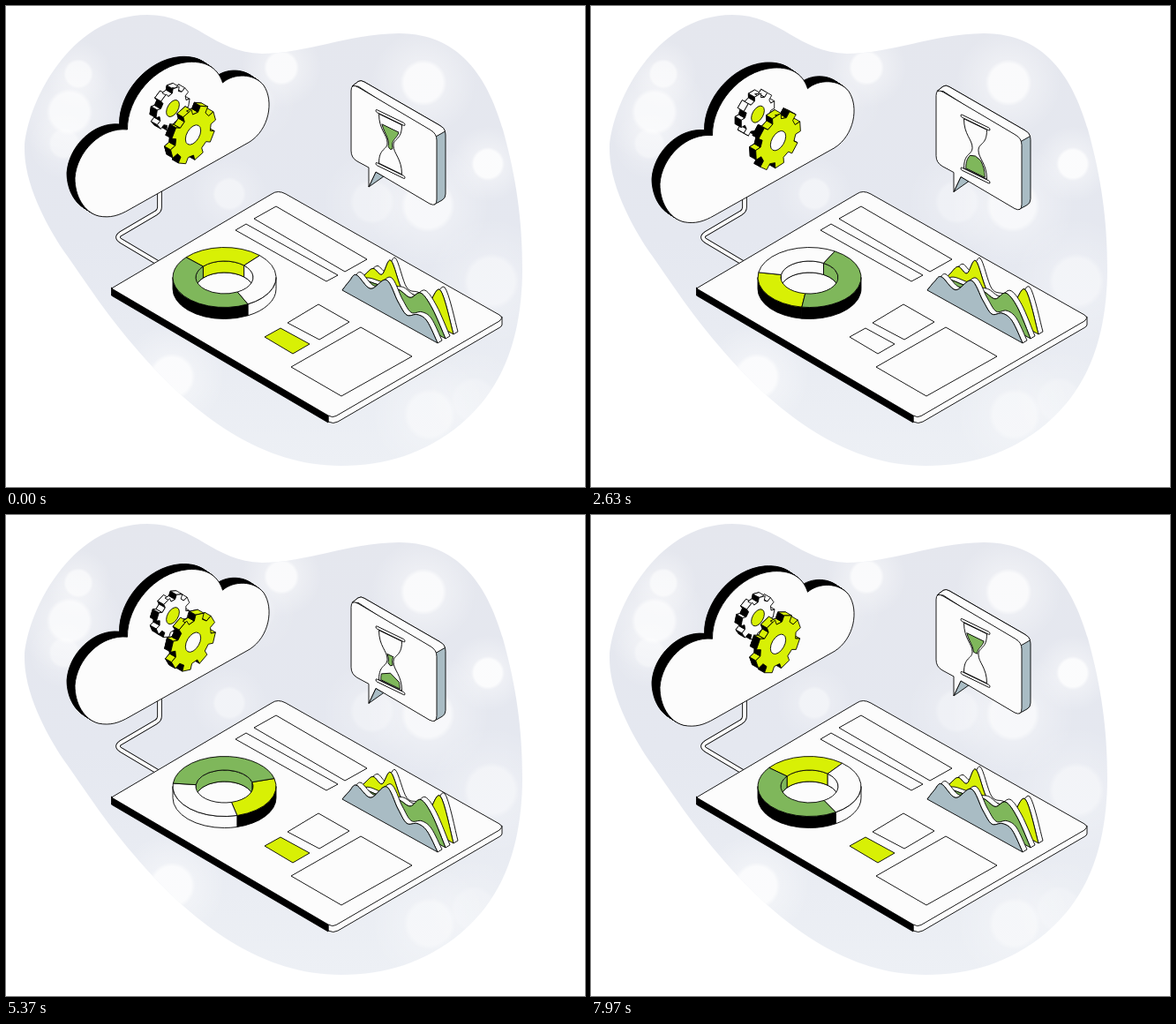
An HTML page with a canvas that plays this animation: 656x545 px, repeating every 8010 ms.

```html
<!DOCTYPE html>
<html lang="en">
<head>
<meta charset="utf-8">
<title>Cloud dashboard</title>
<style>
html, body { margin: 0; width: 100%; height: 100%; overflow: hidden; background: #fff; }
canvas { display: block; }
</style>
</head>
<body>
<canvas id="stage" width="656" height="545"></canvas>
<script>
const ctx = document.getElementById('stage').getContext('2d');
const TAU = Math.PI * 2, CYCLE = 4005, BLINK = CYCLE / 2;
const WHITE = '#fcfcfc', BLACK = '#000', LIME = '#d8f005', GREEN = '#7fb75b', STEEL = '#a9bcc4';

const clamp = v => Math.max(0, Math.min(1, v));
const wave = (t, peak) => Math.cos(TAU * (t - peak) / CYCLE);
const P = d => new Path2D(d);
const poly = pts => P('M' + pts.map(p => p.join(' ')).join('L') + 'Z');

function draw(path, fill, line = .9) {
  if (fill) { ctx.fillStyle = fill; ctx.fill(path); }
  if (line) { ctx.lineWidth = line; ctx.strokeStyle = BLACK; ctx.stroke(path); }
}
function at(x, y, fn) {
  ctx.save();
  ctx.translate(x, y);
  fn();
  ctx.restore();
}

// Backdrop
const blob = P('M21 160C23 115 70 10 160 10C215 10 235 53 290 54C340 54 385 32 445 31C520 31 548 90 563 140C578 195 585 240 585 300C584 390 555 440 515 474C475 507 430 521 380 521C290 521 220 465 170 413C120 360 97 322 65 277C45 247 20 200 21 160Z');
const lights = [
  [82, 77, 16, .7], [72, 120, 25, .75], [66, 156, 17, .5], [312, 70, 19, .8],
  [473, 87, 25, .8], [546, 179, 18, .85], [478, 226, 29, .7], [253, 213, 18, .5],
  [415, 222, 24, .4], [285, 110, 20, .2], [188, 420, 25, .8], [550, 312, 30, .5],
  [480, 463, 28, .5], [530, 447, 25, .3]
];
function backdrop() {
  const g = ctx.createLinearGradient(0, 10, 0, 521);
  g.addColorStop(0, '#e5e7ee');
  g.addColorStop(.5, '#e5e8f0');
  g.addColorStop(1, '#edf0f5');
  ctx.save();
  draw(blob, g, 0);
  ctx.clip(blob);
  for (const [x, y, r, a] of lights) {
    const size = 2.4 * r, glow = ctx.createRadialGradient(x, y, 0, x, y, size);
    for (const [stop, k] of [[0, 1], [.36, 1], [.44, .4], [1, 0]])
      glow.addColorStop(stop, `rgba(255,255,255,${a * k})`);
    ctx.fillStyle = glow;
    ctx.fillRect(x - size, y - size, 2 * size, 2 * size);
  }
  ctx.restore();
}

// Board with its cable and panels
const pipe = P('M174 200V228Q174 232 170 234.500L130 258Q124 262 130 266L172 291');
const panels = [
  'M281 241L306 227L409 287L384 301Z', 'M260 254L272 247L376 305L363 312Z',
  'M319 359L354 338L389 358L355 378Z', 'M323 409L402 364L460 397L380 442Z'
].map(P);
const tile = P('M293 375L311 365L344 383L325 394Z');
function board(t) {
  draw(pipe, null, 5.6);
  ctx.strokeStyle = WHITE;
  ctx.lineWidth = 3.8;
  ctx.stroke(pipe);
  draw(P('M365 464L562 352V361Q562 363 559 364.500L376 471Q371 474 365 471Z'), WHITE);
  draw(P('M119.500 319V328L365 472V463Z'), BLACK);
  draw(P('M119.500 320L301 213Q308 208 317 213L559 350Q564 353 559 357L374 464.500Q370 467 365 464Z'), WHITE);
  panels.forEach(p => draw(p, WHITE));
  const p = t % BLINK;
  ctx.globalAlpha = p < 500 ? clamp(1 - p / 400) : clamp((p - 640) / 360);
  draw(tile, LIME, 0);
  ctx.globalAlpha = 1;
  draw(tile);
}

// Turning ring chart
const RING = { x: 247.5, y: 307.5, rx: 58.5, ry: 34, ix: 32.5, iy: 18.5, depth: 13 };
const parts = [[0, 91, LIME, BLACK], [91, 201, WHITE, WHITE], [201, 360, GREEN, BLACK]];
function wall(rx, ry, a, b, from, fill) {
  for (let k = from - TAU; k < 2 * TAU; k += TAU) {
    const lo = Math.max(a, k), hi = Math.min(b, k + Math.PI);
    if (lo >= hi) continue;
    const w = new Path2D();
    w.ellipse(0, 0, rx, ry, 0, lo, hi);
    w.ellipse(0, RING.depth, rx, ry, 0, hi, lo, true);
    w.closePath();
    draw(w, fill);
  }
}
function ring(t) {
  const { rx, ry, ix, iy, depth } = RING;
  const turn = (222 + 360 * t / CYCLE) % 360;
  const list = parts.map(([a, b, ...c]) => [(a + turn) * TAU / 360, (b + turn) * TAU / 360, ...c]);
  for (const [a, b, , side] of list) wall(rx, ry, a, b, 0, side);
  const hole = new Path2D(), floor = new Path2D();
  hole.ellipse(0, 0, ix, iy, 0, 0, TAU);
  floor.ellipse(0, depth, ix, iy, 0, 0, TAU);
  ctx.save();
  ctx.clip(hole);
  draw(floor, WHITE);
  for (const [a, b, face] of list) wall(ix, iy, a, b, Math.PI, face);
  ctx.restore();
  for (const [a, b, face] of list) {
    const s = new Path2D();
    s.ellipse(0, 0, rx, ry, 0, a, b);
    s.ellipse(0, 0, ix, iy, 0, b, a, true);
    s.closePath();
    draw(s, face);
  }
}

// Cloud and gears
const cloud = P('M137.500 140C137 105 168 67 206 63.500C230 62 241 73 245.500 87C258 76 281 76 292 90C304 108 298 140 276 154L140 230.500C128 237.500 118 240.500 105 238C88 233.500 78 215 78 195C80 165 108 137 137.500 140Z');
function gear(R, turn, face, hub, hubR) {
  const pts = [], [sx, sy] = [-7, -4];
  for (let i = 0; i < 8; i++)
    for (const [off, r] of [[-.24, .79], [-.19, 1], [.19, 1], [.24, .79]]) {
      const a = turn + i * TAU / 8 + off, u = R * r * Math.cos(a);
      pts.push([.866 * u, R * r * Math.sin(a) - .5 * u]);
    }
  const back = ([x, y]) => [x + sx, y + sy];
  draw(poly(pts.map(back)), BLACK);
  pts.forEach((p, i) => {
    const q = pts[(i + 1) % pts.length], nx = q[1] - p[1], ny = p[0] - q[0];
    if (nx * sx + ny * sy <= 0) return;
    draw(poly([p, q, back(q), back(p)]), ny < -.55 * Math.abs(nx) ? face : BLACK);
  });
  draw(poly(pts), face);
  const h = new Path2D(), c = new Path2D();
  c.arc(0, 0, hubR, 0, TAU);
  h.addPath(c, new DOMMatrix([.866, -.5, 0, 1, 0, 0]));
  draw(h, hub);
}
function cloudGroup(t) {
  for (let k = 9; k > 0; k--) at(-k, -k * 6 / 9, () => draw(cloud, BLACK));
  draw(cloud, WHITE);
  const turn = TAU * t / CYCLE;
  at(189, 116, () => gear(22, .2 - turn, WHITE, LIME, 8.5));
  at(212, 146, () => gear(29.5, .52 + turn, LIME, WHITE, 10));
}

// Area charts: base point, colour, [distance, height] along the base
const sheets = [
  [399, 312, LIME, [[0, 0], [8, 13], [17, 25], [27, 23], [37, 43], [50, 17], [64, 19], [78, 16], [93, 43], [108, 0]]],
  [390, 317, GREEN, [[0, 0], [14, 14], [30, 18], [45, 21], [56, 25], [68, 24], [80, 37], [93, 27], [108, 0]]],
  [381, 322, STEEL, [[0, 0], [8, 14], [16, 25], [32, 19], [50, 40], [63, 23], [73, 13], [85, 20], [96, 18], [108, 0]]]
];
function spline(pts) {
  const out = [], n = pts.length - 1;
  for (let i = 0; i < n; i++) {
    const [a, b, c, d] = [-1, 0, 1, 2].map(k => pts[Math.max(0, Math.min(n, i + k))]);
    for (let s = 0; s < 1; s += .125)
      out.push([0, 1].map(k => b[k] + .5 * s * (c[k] - a[k] + s * (2 * a[k] - 5 * b[k] + 4 * c[k] - d[k] + s * (3 * (b[k] - c[k]) + d[k] - a[k])))));
  }
  return [...out, pts[n]];
}
function charts(t) {
  sheets.forEach(([x, y, fill, pts], j) => {
    const top = spline(pts.map(([d, h], i) =>
      [x + d, y + .555 * d - h * (1 + .05 * wave(t, 3400 + (i - 4) * 500 + j * 900))]));
    const edge = top.map(([a, b]) => [a + 5, b - 3]);
    draw(poly([...top, ...edge.reverse()]), WHITE);
    draw(poly(top), fill);
  });
}

// Speech bubble and hourglass
const glass = P('M-15 -28C-15 -10 -4 -9 -4 0C-4 9 -15 10 -15 28H15C15 10 4 9 4 0C4 -9 15 -10 15 -28Z');
const inner = P('M-12.500 -28C-12.500 -11 -2.500 -9 -2.500 0C-2.500 9 -12.500 11 -12.500 27H12.500C12.500 11 2.500 9 2.500 0C2.500 -9 12.500 -11 12.500 -28Z');
function sand(pts) {
  ctx.save();
  ctx.clip(inner);
  draw(poly(pts), GREEN, 0);
  draw(inner, null, 1.6);
  draw(poly(pts));
  ctx.restore();
}
function pile(pts) {
  ctx.save();
  ctx.clip(poly(pts));
  draw(inner, GREEN);
  ctx.restore();
  ctx.save();
  ctx.clip(inner);
  draw(poly(pts));
  ctx.restore();
}
function hourglass(t) {
  const p = t % CYCLE, drain = clamp(p / 2000), q = clamp((p - 2870) / 1030);
  const ease = q < .5 ? 4 * q ** 3 : 1 - 4 * (1 - q) ** 3;
  ctx.transform(.866, .42, 0, 1, 0, 0);
  ctx.rotate(Math.PI * ease);
  draw(glass, WHITE);
  if (q > 0) {
    const slide = clamp(2 * q - 1), a = 8 - 8 * slide, b = 28 - 10 * slide;
    pile([[-14, a + 2], [0, a], [14, a + 2], [14, b], [-14, b]]);
  } else {
    if (drain < 1) {
      const level = -18 + 18 * drain;
      pile([[-14, level], [14, level], [3, 4], [0, 6], [-3, 4]]);
    }
    const peak = 28 - 20 * drain, rim = 28 - 16 * drain ** 2;
    pile([[-13, rim], [0, peak], [13, rim], [13, 28], [-13, 28]]);
  }
  for (const v of [-30, 30]) {
    const cap = new Path2D();
    cap.roundRect(-19, v - 1.5, 38, 3, 1.5);
    draw(cap, WHITE);
  }
}
function bubble(t) {
  draw(P('M392 91L399 85.500Q402 83.500 406 86L491 135Q498 139 498 146V213Q498 218 494 220L485 225Z'), STEEL);
  draw(P('M392 91L399 85.500Q402 83.500 406 86L491 135Q497 138 497.500 142L487 148L399 91Z'), WHITE);
  draw(P('M419 188L411 205L428 193Z'), STEEL);
  draw(P('M391 96Q391 87.500 399 92L481 140.500Q488 144.500 488 152V219Q488 228 480 224L419 188L411 205V183L398 176Q391 172 391 164Z'), WHITE);
  at(435.5, 156.5, () => hourglass(t));
}

function frame() {
  const t = performance.now() % (2 * CYCLE);
  ctx.clearRect(0, 0, 656, 545);
  ctx.lineJoin = 'round';
  backdrop();
  board(t);
  at(0, 1.57 - 5.3 * wave(t, 810), () => cloudGroup(t));
  at(RING.x, RING.y, () => ring(t));
  charts(t);
  at(0, 4.5 + 4.8 * wave(t, 1770), () => bubble(t));
  requestAnimationFrame(frame);
}
frame();
</script>
</body>
</html>
```
